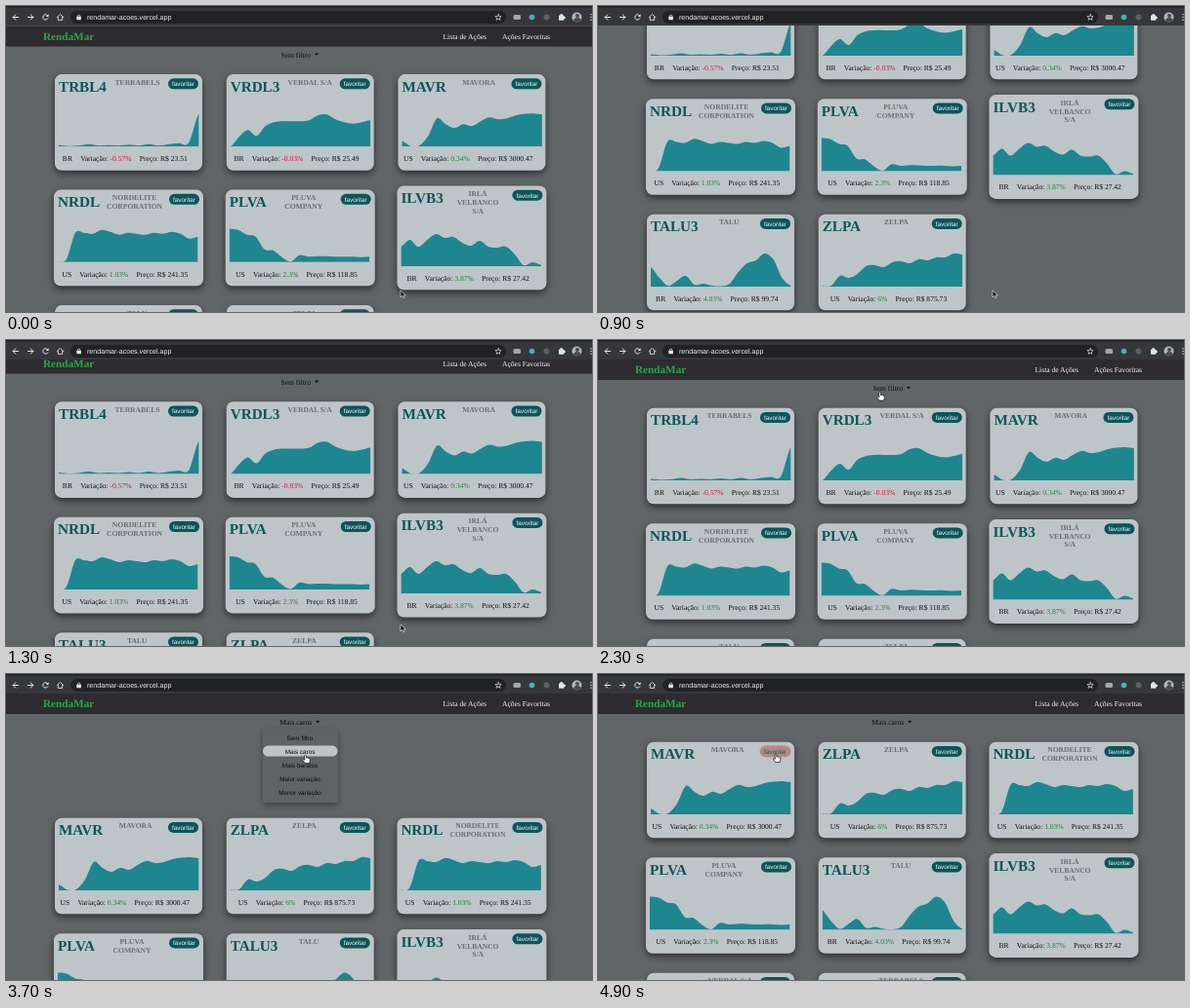
An HTML page with a canvas that plays this animation: 600 px wide and 314 px high, repeating every 5 s.

```html
<!DOCTYPE html>
<html lang="pt-BR">
<head>
<meta charset="utf-8">
<title>RendaMar</title>
<style>
html, body { margin: 0; width: 100%; height: 100%; overflow: hidden; background: #606567; }
canvas { display: block; width: 600px; height: 314px; }
</style>
</head>
<body>
<canvas id="stage"></canvas>
<script>
const W = 600, H = 314, LOOP = 5000, STEP = 100;
const SERIF = '"Liberation Serif", "Times New Roman", serif';
const SANS = '"Liberation Sans", Arial, sans-serif';
const BODY = `7.57px ${SERIF}`, BOLD = `bold 7.57px ${SERIF}`;
const TICKER = `bold 15.2px ${SERIF}`, SMALL = `6.35px ${SANS}`;
const CARD = '#bdc5c8', TEAL = '#1e868f', DEEP = '#0c5558';

const canvas = document.getElementById('stage');
const dpr = Math.max(1, window.devicePixelRatio || 1);
canvas.width = W * dpr;
canvas.height = H * dpr;
const c = canvas.getContext('2d');
c.scale(dpr, dpr);
c.textRendering = 'geometricPrecision';

const stock = (ticker, name, country, change, price, data) =>
  ({ ticker, lines: name.split('|'), country, change, price, data });

const stocks = [
  stock('TRBL4', 'TERRABELS', 'BR', -0.57, 23.51,
    [1.5, .5, 1, 2.5, 1, 1.5, 1, 2, 1, 2.5, 1, 2.5, 3.5, 4, 34]),
  stock('VRDL3', 'VERDAL S/A', 'BR', -0.03, 25.49,
    [0, 10, 17, 11, 21, 25, 26, 26, 26, 27, 32, 33, 28, 25, 23.5, 25, 27]),
  stock('MAVR', 'MAVORA', 'US', 0.34, 3000.47,
    [6, .5, 1, 11, 29, 23, 19, 23, 21, 26, 30, 28, 29, 32, 33.5, 34, 33]),
  stock('NRDL', 'NORDELITE|CORPORATION', 'US', 1.03, 241.35,
    [0, 3, 30, 30, 29, 33, 31, 28, 30, 29, 28, 30, 29, 31, 29, 24, 26]),
  stock('PLVA', 'PLUVA|COMPANY', 'US', 2.3, 118.85,
    [34, 33, 28, 26, 13, 12, 5, .5, 7, 5.5, 6, 6, 5.5, 5.5, 5.5, 5, 5.5]),
  stock('ILVB3', 'IRLÁ|VELBANCO|S/A', 'BR', 3.87, 27.42,
    [20, 27, 20, 27, 33, 29, 30, 24, 21, 26, 20, 19, 20, 12, 1, 4, 1.5]),
  stock('TALU3', 'TALU', 'BR', 4.03, 99.74,
    [20, 9, 1, 6, 11, 2, 3, 1, .5, 3, 15, 24, 27, 34, 28, 9, 1]),
  stock('ZLPA', 'ZELPA', 'US', 6, 875.73,
    [.5, 1, 11, 9, 13, 21, 22, 20, 25, 26, 24, 28, 27, 30, 30, 34, 33])
];
const byPrice = [...stocks].sort((a, b) => b.price - a.price);
const options = ['Sem filtro', 'Mais caros', 'Mais baratos', 'Maior variação', 'Menor variação'];

const scrollKeys = [[0, -.4], [100, 15], [200, 65], [300, 92], [400, 98.3], [700, 98.3],
  [800, 97], [900, 93], [1000, 72], [1100, 42], [1200, 18], [1300, 6.4], [1400, 2], [1600, 0]];

const smooth = k => k * k * (3 - 2 * k);
const progress = (t, a, b) => smooth(Math.min(1, Math.max(0, (t - a) / (b - a))));

function track(keys, t) {
  const i = keys.findIndex(k => k[0] > t);
  if (i < 0) return keys[keys.length - 1][1];
  const [t0, a] = keys[i - 1], [t1, b] = keys[i];
  return a + (b - a) * (t - t0) / (t1 - t0);
}

function pointer(t) {
  const stops = [[404, 292], [288.5, 53.5], [306.5, 83], [182, 82]];
  const times = [[1500, 2200], [3200, 3500], [4000, 4700]];
  let [x, y] = stops[0];
  times.forEach(([a, b], i) => {
    const k = progress(t, a, b);
    x += (stops[i + 1][0] - stops[i][0]) * k;
    y += (stops[i + 1][1] - stops[i][1]) * k;
  });
  return { x, y };
}

function text(s, x, y, font, color, align = 'left') {
  c.font = font;
  c.fillStyle = color;
  c.textAlign = align;
  c.fillText(s, x, y);
}

function width(s, font) {
  c.font = font;
  return c.measureText(s).width;
}

function box(x, y, w, h, r, color) {
  c.beginPath();
  c.roundRect(x, y, w, h, r);
  c.fillStyle = color;
  c.fill();
}

function disc(x, y, r, color) {
  c.beginPath();
  c.arc(x, y, r, 0, Math.PI * 2);
  c.fillStyle = color;
  c.fill();
}

function poly(points, close) {
  c.beginPath();
  points.forEach(([x, y]) => c.lineTo(x, y));
  if (close) c.closePath();
}

function stroke(color, w) {
  c.strokeStyle = color;
  c.lineWidth = w;
  c.stroke();
}

function shadowed(blur, dy, alpha, draw) {
  c.save();
  c.shadowColor = `rgba(0,0,0,${alpha})`;
  c.shadowBlur = blur * dpr;
  c.shadowOffsetY = dy * dpr;
  draw();
  c.restore();
}

function area(data, x, base, w) {
  const dx = w / (data.length - 1);
  const at = i => data[Math.min(data.length - 1, Math.max(0, i))];
  c.save();
  c.beginPath();
  c.rect(x, base - 40, w, 40);
  c.clip();
  c.beginPath();
  c.moveTo(x, base);
  c.lineTo(x, base - data[0]);
  for (let i = 0; i < data.length - 1; i++) {
    const m0 = (at(i + 1) - at(i - 1)) / 6, m1 = (at(i + 2) - at(i)) / 6;
    c.bezierCurveTo(x + dx * (i + 1 / 3), base - at(i) - m0,
      x + dx * (i + 2 / 3), base - at(i + 1) + m1,
      x + dx * (i + 1), base - at(i + 1));
  }
  c.lineTo(x + w, base);
  c.fillStyle = TEAL;
  c.fill();
  c.restore();
}

const cardHeight = s => s.lines.length > 2 ? 106.8 : 98.6;

function card(s, cx, top, hot) {
  const w = s.lines.length > 1 ? 153 : 151, h = cardHeight(s);
  const x = cx - w / 2, extra = h - 98.6, bx = x + w - 35;
  shadowed(7, 3, .55, () => box(x, top, w, h, 7, CARD));

  text(s.ticker, x + 4, top + 17.6, TICKER, DEEP);
  const mid = (x + 4 + width(s.ticker, TICKER) + bx) / 2;
  s.lines.forEach((line, i) => text(line, mid, top + 10.6 + i * 8.8, BOLD, '#6a6f71', 'center'));

  box(bx, top + 4.2, 31, 11, 5.5, hot ? '#a58d8b' : DEEP);
  if (hot) stroke('#e8797b', 1);
  text('favoritar', bx + 15.5, top + 12, SMALL, hot ? '#0e5f50' : '#f2f6f6', 'center');

  area(s.data, x + 4, top + 74.2 + extra, 143.5);

  const parts = [
    [s.country, '#111'], ['Variação: ', '#111'],
    [s.change + '%', s.change < 0 ? '#d3143c' : '#25803a'],
    ['Preço: R$ ' + s.price.toFixed(2), '#111']
  ];
  const sizes = parts.map(p => width(p[0], BODY)), gap = 8.2;
  let px = cx - 3.7 - (sizes.reduce((a, b) => a + b) + gap * 2) / 2;
  parts.forEach(([label, color], i) => {
    text(label, px, top + 89 + extra, BODY, color);
    px += sizes[i] + (i === 1 ? 0 : gap);
  });
}

function nav() {
  box(0, 20, W, 21, 0, '#2d2b2f');
  text('RendaMar', 38, 34.4, `bold 11.2px ${SERIF}`, '#28a745');
  text('Lista de Ações', 447.5, 33.4, BODY, '#f4f4f4');
  text('Ações Favoritas', 508, 33.4, BODY, '#f4f4f4');
}

function filter(label, open, p) {
  if (open) {
    shadowed(6, 3, .35, () => box(263, 56, 77, 76, 2, '#5e6365'));
    options.forEach((o, i) => {
      const y = 65.2 + i * 14;
      if (Math.abs(p.y - 3.5 - y) < 6) box(263, y - 5.6, 76.5, 11, 5.5, CARD);
      text(o, 301, y + 2.3, SMALL, '#0c0c0c', 'center');
    });
  }
  const w = width(label, BODY), x = 300.7 - (w + 8) / 2;
  text(label, x, 52.2, BODY, '#0e0e0e');
  poly([[x + w + 3.8, 48], [x + w + 8.2, 48], [x + w + 6, 50.3]], true);
  c.fillStyle = '#0e0e0e';
  c.fill();
}

function cards(list, offset, hot) {
  let top = 69.7 + offset;
  for (let i = 0; i < list.length; i += 3) {
    const row = list.slice(i, i + 3), tall = Math.max(...row.map(cardHeight));
    row.forEach((s, j) => card(s, 125.5 + j * 175.7, top + (tall - cardHeight(s)) / 2, hot && i + j === 0));
    top += tall + 15.8;
  }
}

function toolbar() {
  const ink = '#e4e5e7';
  box(0, 0, W, 20, 0, '#36373a');
  box(0, 0, W, 1.5, 0, '#202124');
  box(66, 5, 446, 13, 6.5, '#212226');
  c.lineCap = 'round';

  for (const [x, d] of [[10, -1], [25, 1]]) {
    poly([[x - 2.8 * d, 11.5], [x + 2.8 * d, 11.5]]);
    stroke(ink, 1);
    poly([[x + .2 * d, 8.8], [x + 2.8 * d, 11.5], [x + .2 * d, 14.2]]);
    stroke(ink, 1);
  }
  c.beginPath();
  c.arc(40.5, 11.5, 2.7, .5, 5.4);
  stroke(ink, 1);
  poly([[43.6, 8.2], [43.6, 11], [40.8, 11]], true);
  c.fillStyle = ink;
  c.fill();
  poly([[52.2, 11.6], [55.5, 8.4], [58.8, 11.6]]);
  stroke(ink, .9);
  poly([[53.3, 11.2], [53.3, 14.4], [57.7, 14.4], [57.7, 11.2]]);
  stroke(ink, .9);

  box(72.3, 10.7, 4.6, 3.6, .5, ink);
  c.beginPath();
  c.arc(74.6, 10.5, 1.4, Math.PI, 0);
  stroke(ink, .8);
  text('rendamar-acoes.vercel.app', 83, 14, `7.1px ${SANS}`, '#f0f0f1');

  poly(Array.from({ length: 10 }, (_, i) => {
    const r = i % 2 ? 1.5 : 3.3, a = i * Math.PI / 5;
    return [504 + r * Math.sin(a), 11.7 - r * Math.cos(a)];
  }), true);
  stroke(ink, .7);

  box(519.5, 9, 7.5, 5, 1.5, '#a5a7aa');
  disc(538.5, 11.5, 2.8, '#3fb3c4');
  disc(553.5, 11.5, 3, '#5d6165');
  box(566, 9.4, 5.4, 5.4, .7, ink);
  disc(568.6, 9.2, 1.3, ink);
  disc(571.6, 12, 1.3, ink);

  c.save();
  disc(584.5, 11.5, 5, '#aeb8c0');
  c.clip();
  disc(585, 10, 2, '#4c4a4d');
  disc(585, 16, 4, '#4c4a4d');
  c.restore();
  for (const y of [8.8, 11.5, 14.2]) disc(599, y, .7, ink);
}

function arrow(x, y) {
  c.save();
  c.translate(x, y);
  poly([[0, 0], [0, 6.9], [1.6, 5.4], [2.7, 7.9], [3.8, 7.4], [2.8, 5], [4.9, 5]], true);
  c.fillStyle = '#080808';
  c.fill();
  stroke('#f5f5f5', .6);
  c.restore();
}

function hand(x, y) {
  c.save();
  c.translate(x, y);
  c.beginPath();
  c.moveTo(-.8, .7);
  c.quadraticCurveTo(0, -.5, .8, .7);
  c.lineTo(.9, 3);
  c.quadraticCurveTo(2, 2.4, 2.5, 3.3);
  c.quadraticCurveTo(3.5, 2.8, 3.9, 3.8);
  c.quadraticCurveTo(5, 3.7, 4.9, 5);
  c.lineTo(4.1, 8.6);
  c.lineTo(-.4, 8.6);
  c.lineTo(-2.8, 5.2);
  c.quadraticCurveTo(-2.4, 3.9, -.8, 5.1);
  c.closePath();
  c.fillStyle = '#fff';
  c.fill();
  stroke('#111', .7);
  c.restore();
}

function draw(t) {
  const p = pointer(t), sorted = t >= 3600, open = t >= 3100 && t < 4000;
  box(0, 0, W, H, 0, '#606567');
  c.save();
  c.translate(0, -track(scrollKeys, t));
  cards(sorted ? byPrice : stocks, open ? 78 : 0, t >= 4900);
  nav();
  filter(options[sorted ? 1 : 0], open, p);
  c.restore();
  toolbar();
  const clickable = (t >= 2200 && t <= 4000) || t >= 4700;
  (clickable ? hand : arrow)(p.x, p.y);
}

const start = performance.now();
function tick() {
  const t = (performance.now() - start) % LOOP;
  draw(Math.floor(t / STEP) * STEP);
  requestAnimationFrame(tick);
}
tick();
</script>
</body>
</html>
```
